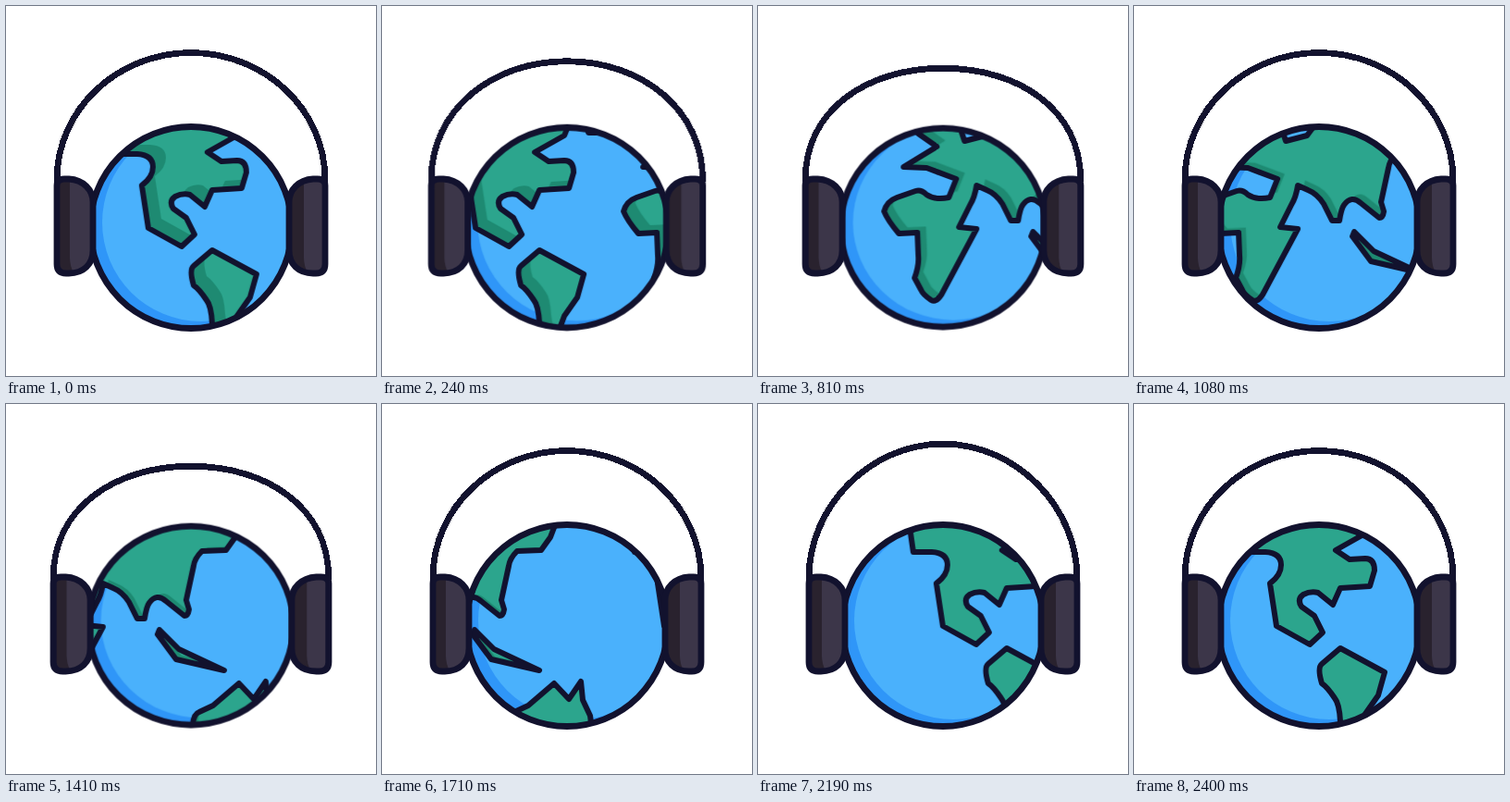
An HTML page that plays this animation: 400 by 400 pixels, repeating every 2.43 s.

```html
<!DOCTYPE html>
<html lang="en">
<head>
<meta charset="utf-8">
<title>Globe with headphones</title>
<style>
  html, body { margin: 0; width: 100%; height: 100%; overflow: hidden; background: #fff; }
  svg { display: block; width: 100%; height: 100%; }

  .line {
    fill: none; stroke: #12122e; stroke-width: 6;
    stroke-linejoin: round; stroke-linecap: round;
    vector-effect: non-scaling-stroke;
  }
  .outer { stroke-width: 6.8; }
  .sea { fill: #4ab1fc; }
  .sea-shade { fill: #2f96f8; }
  .land { fill: #2ca58d; }
  .land-shade { fill: #1e8a72; }
  .cup { fill: #29222e; }
  .cup-light { fill: #3c3649; }

  .spin, .shine, .globe, .phones, .band { animation: 2430ms linear infinite; }
  .spin { animation-name: spin; }
  .shine { animation-name: shine; }
  .globe { animation-name: globe; transform-origin: 200px 239.5px; }
  .phones { animation-name: phones; transform-origin: 200px 188px; }
  .band { animation-name: band; shape-rendering: crispEdges; }
  .globe, .phones, .band { animation-timing-function: ease-in-out; }

  /* The turn takes 2400 ms, then rests for 30 ms. */
  @keyframes spin {
    98.765%, 100% { transform: translateX(-526px); }
  }
  @keyframes shine {
    0% { transform: translate(14px, -10px); }
    98.765%, 100% { transform: none; }
  }

  /* Four beats of 600 ms: squash at 120, rebound, rest from 480. */
  @keyframes globe {
    0%, 12.346%, 24.691%, 37.037%, 49.383%, 61.728%, 74.074%, 86.42%, 98.765%, 100% { transform: none; }
    4.938%, 29.63%, 54.321%, 79.012% { transform: scale(1.03, .97); }
  }
  @keyframes phones {
    0%, 12.346%, 24.691%, 37.037%, 49.383%, 61.728%, 74.074%, 86.42%, 98.765%, 100% { transform: none; }
    4.938%, 29.63%, 54.321%, 79.012% { transform: scaleX(1.054); }
  }
  /* Only the crown of the band moves; its sides keep their handles. */
  @keyframes band {
    0%, 19.753%, 24.691%, 44.444%, 49.383%, 69.136%, 74.074%, 93.827%, 98.765%, 100% {
      d: path("M55 188C55 112 120 50.5 200 50.5C280 50.5 345 112 345 188");
    }
    4.938%, 29.63%, 54.321%, 79.012% {
      d: path("M55 188C55 112 120 78 200 78C280 78 345 112 345 188");
    }
    14.815%, 39.506%, 64.198%, 88.889% {
      d: path("M55 188C55 112 120 42 200 42C280 42 345 112 345 188");
    }
  }
</style>
</head>
<body>
<svg viewBox="0 0 400 400">
  <defs>
    <clipPath id="disc-clip"><circle class="globe" cx="200" cy="239.5" r="109"/></clipPath>
    <clipPath id="sea-clip"><circle cx="200" cy="239.5" r="109"/></clipPath>

    <path id="map" d="
      M134 110L119 139L122 160H142Q159 161 159 174Q159 185 147 194L154 240L190 260L204 247L195 229L181 219
      Q176 211 183 206Q191 202 199 204L215 217L223 199L255 197L260 180Q260 167 250 167L233 168L218 158L250 140L262 110Z
      M272 115L276 137H284L291 115Z
      M223 264L271 290L264 315L250 335L235 375H228L223 343Q222 324 217 318Q209 306 203 302Q198 285 203 281Z
      M314 222Q317 211 328 207L348 200Q354 198 360 204Q369 210 384 207L392 187L360 175L335 174L371 152L351 138L330 110
      H398V137L401 146L424 140L435 125V110H570L557 144L547 158L521 159Q513 167 512 175L504 212L507 222Q506 229 502 229
      L482 213Q472 204 464 215Q461 219 459 232H451L442 214Q435 203 425 199L414 194Q412 207 407 215L395 239L414 241
      L376 312Q370 321 365 318Q356 312 354 307L347 294Q352 280 351 270L350 245L330 246Q318 232 314 222Z
      M475 244L496 265L545 288L493 276L473 249Z
      M505 375L511 347Q512 335 518 333L533 326L561 302L577 319L590 300L592 320L600 337L605 375Z"/>
    <g id="maps">
      <use href="#map"/>
      <use href="#map" x="526"/>
    </g>
    <clipPath id="maps-clip">
      <use href="#map"/>
      <use href="#map" x="526"/>
    </clipPath>

    <path id="cup" d="M55 194Q55 187 63 187H68C84 188 94 199 94 212V264C94 279 84 289 68 289H65Q55 289 55 279Z"/>
    <clipPath id="cup-clip"><use href="#cup"/></clipPath>
  </defs>

  <g class="globe">
    <circle class="sea-shade" cx="200" cy="239.5" r="109"/>
    <g clip-path="url(#sea-clip)"><circle class="sea" cx="211" cy="234" r="107"/></g>
  </g>
  <g clip-path="url(#disc-clip)">
    <g class="spin">
      <use href="#maps" class="land-shade"/>
      <g clip-path="url(#maps-clip)">
        <g class="shine"><use href="#maps" class="land"/></g>
      </g>
      <use href="#maps" class="line"/>
    </g>
  </g>
  <g class="globe"><circle class="line outer" cx="200" cy="239.5" r="109"/></g>

  <g class="phones">
    <path class="line outer band" d="M55 188C55 112 120 50.5 200 50.5C280 50.5 345 112 345 188"/>
    <use href="#cup" class="cup"/>
    <path class="cup-light" clip-path="url(#cup-clip)" d="M69 180V272Q69 284 77 295H100V180Z"/>
    <use href="#cup" class="line outer"/>
    <g transform="matrix(-1 0 0 1 400 0)">
      <use href="#cup" class="cup"/>
      <path class="cup-light" clip-path="url(#cup-clip)" d="M78 180V272Q78 284 70 295H50V180Z"/>
      <use href="#cup" class="line outer"/>
    </g>
  </g>
</svg>
</body>
</html>
```
